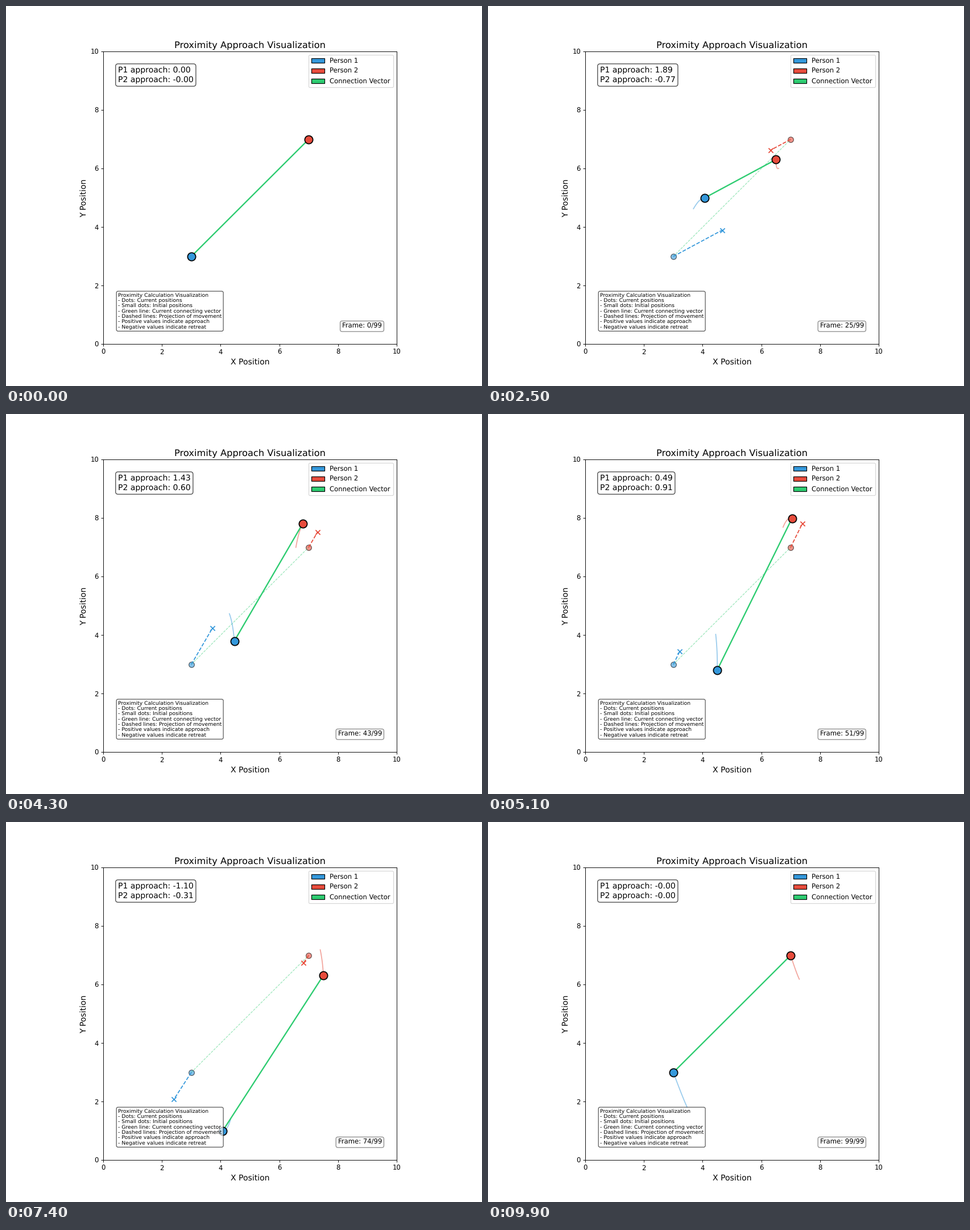
A matplotlib script that plays this animation: 837 px wide and 669 px high, repeating every 10 s.

```python
import numpy as np
import matplotlib.pyplot as plt
from matplotlib.animation import FuncAnimation
from matplotlib.patches import Patch

N = 100
TRAIL = 10
DPI = 83.7
BLUE, RED, GREEN = "#3498db", "#e74c3c", "#2ecc71"
NOTES = """Proximity Calculation Visualization
- Dots: Current positions
- Small dots: Initial positions
- Green line: Current connecting vector
- Dashed lines: Projection of movement
- Positive values indicate approach
- Negative values indicate retreat"""

plt.rcParams["font.family"] = "DejaVu Sans"
plt.rcParams["text.hinting"] = "none"

t = np.linspace(0, 2 * np.pi, N)
path1 = np.column_stack([3 + 1.5 * np.sin(t / 2), 3 + 2 * np.sin(t)])
path2 = np.column_stack([7 - 0.5 * np.sin(t), 7 - np.sin(1.5 * t)])
start1, start2 = path1[0], path2[0]

fig = plt.figure(figsize=(10, 669 / DPI), dpi=DPI)
ax = fig.add_axes([0.2045, 0.11, 0.616, 0.77], xlim=(0, 10), ylim=(0, 10))
ax.set_title("Proximity Approach Visualization", fontsize=14)
ax.set_xlabel("X Position", fontsize=12)
ax.set_ylabel("Y Position", fontsize=12)


def line(color, width, **style):
    return ax.plot([], [], color=color, lw=width, **style)[0]


def dot(point, color, area, edge, **style):
    return ax.scatter(*point, s=area, c=color, edgecolors="black", linewidths=edge, **style)


def cross(point, color):
    return ax.scatter(*point, s=50, c=color, marker="x", linewidths=1.5, zorder=2.2)


def label(x, y, size, alpha, text="", **style):
    box = dict(boxstyle="round", facecolor="white", alpha=alpha)
    return ax.text(x, y, text, fontsize=size, bbox=box, **style)


def join(artist, *points):
    artist.set_data(*np.transpose(points))


# Static starting layout
actors = ((BLUE, start1), (RED, start2))
for color, start in actors:
    dot(start, color, 70, 1, alpha=0.6, zorder=1)
join(line(GREEN, 1, ls="--", alpha=0.5), start1, start2)

# Moving parts, back to front
trails = [line(c, 1.5, alpha=0.5) for c, _ in actors]
link = line(GREEN, 2)
shadows = [line(c, 1.5, ls="--") for c, _ in actors]
tips = [cross(p, c) for c, p in actors]
dots = [dot(p, c, 150, 1.5, zorder=2.5) for c, p in actors]

values = label(0.5, 9.5, 12, 0.8, va="top", linespacing=1.37)
counter = label(9.5, 0.5, 10, 0.5, ha="right", va="bottom")
label(0.5, 0.5, 8, 0.7, NOTES, va="bottom", linespacing=1.09)

ax.legend(
    handles=[
        Patch(facecolor=c, edgecolor="black", label=name)
        for c, name in ((BLUE, "Person 1"), (RED, "Person 2"), (GREEN, "Connection Vector"))
    ],
    loc="upper right",
    labelspacing=0.54,
    borderpad=0.42,
)
ax.set(xlim=(0, 10), ylim=(0, 10))


def update(i):
    p1, p2 = path1[i], path2[i]
    unit = (p2 - p1) / np.hypot(*(p2 - p1))
    near1 = np.dot(p1 - start1, unit)
    near2 = -np.dot(start2 - p2, unit)

    join(link, p1, p2)
    for k, (path, near) in enumerate(((path1, near1), (path2, near2))):
        tip = path[0] + near * unit
        join(trails[k], *path[max(0, i - TRAIL):i + 1])
        join(shadows[k], path[0], tip)
        tips[k].set_offsets(tip)
        dots[k].set_offsets(path[i])

    values.set_text(f"P1 approach: {near1:.2f}\nP2 approach: {near2:.2f}")
    counter.set_text(f"Frame: {i}/{N - 1}")
    return [link, *trails, *shadows, *tips, *dots, values, counter]


anim = FuncAnimation(fig, update, frames=N, interval=100, repeat=True, repeat_delay=0)
plt.show()
```
